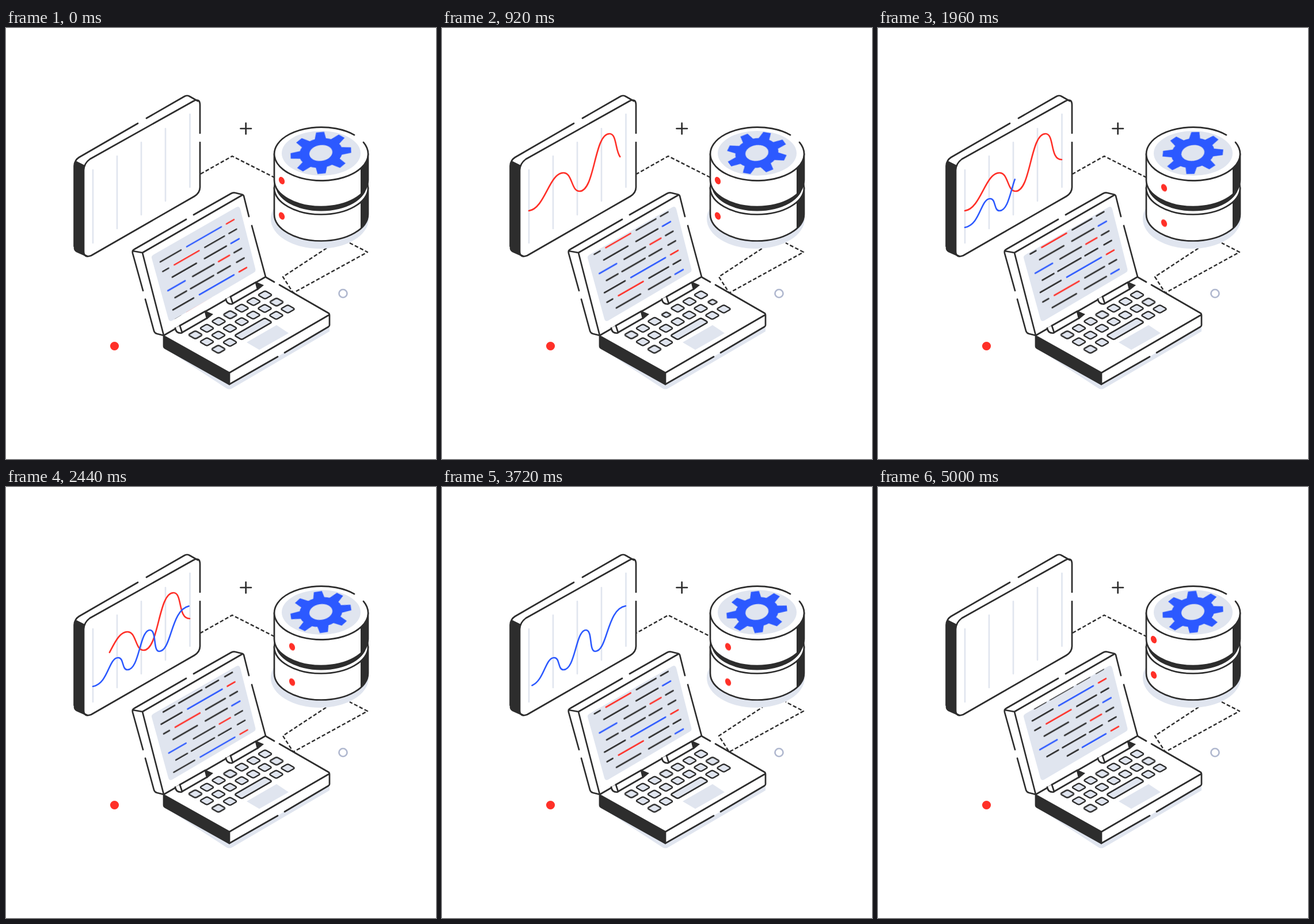
An HTML page without scripts that plays this animation: 747x750 px, repeating every 5040 ms.

```html
<!DOCTYPE html>
<html lang="en">
<head>
<meta charset="utf-8">
<title>Data workstation</title>
<style>
  html, body { margin: 0; width: 100%; height: 100%; overflow: hidden; background: #fff; }
  svg { display: block; }

  .line { fill: none; stroke: #2d2d2d; stroke-width: 2.7; stroke-linecap: round; stroke-linejoin: round; }
  .face { fill: #fff; }
  .dark { fill: #2d2d2d; }
  .pale { fill: #e0e5ef; }
  .red { fill: #ff3028; }
  .blue { fill: #2c59ff; }
  .key { fill: #e0e5ef; stroke-width: 2.5; vector-effect: non-scaling-stroke; }
  .grid { stroke: #e0e5ef; stroke-width: 2.6; stroke-linecap: round; }
  .dashes { stroke-width: 2.4; stroke-dasharray: 6.5 3.5; stroke-linecap: butt; animation: flow 5.04s linear infinite; }

  .code { fill: none; stroke-width: 2.6; stroke-linecap: round; }
  .code path, .k, .r, .b { vector-effect: non-scaling-stroke; }
  .k { stroke: #2d2d2d; }
  .r { stroke: #ff3028; }
  .b { stroke: #2c59ff; }

  .scroll { animation: scroll 5.04s infinite; }
  .curve {
    fill: none; stroke-width: 2.6; stroke-linecap: round;
    stroke-dasharray: 1 3; stroke-dashoffset: 1.01; vector-effect: none;
    animation: trim 5.04s infinite;
  }
  .late { animation-delay: 1.44s; }
  .gear { animation: spin 5.04s linear infinite; }
  .lights { animation: toggle 5.04s step-end infinite; }
  .press { animation: press 5.04s var(--at) infinite; }

  @keyframes scroll {
    0% { transform: none; animation-timing-function: cubic-bezier(.333, 0, .667, 1); }
    99.2%, 100% { transform: translateY(-334px); }
  }
  @keyframes trim {
    0% { stroke-dashoffset: 1.01; animation-timing-function: cubic-bezier(.333, 0, .667, 1); }
    20.63% { stroke-dashoffset: 0; }
    43.65% { stroke-dashoffset: 0; animation-timing-function: cubic-bezier(.333, 0, .667, 1); }
    64.29%, 100% { stroke-dashoffset: -1.01; }
  }
  @keyframes spin {
    0% { transform: rotate(-1.5deg); }
    99.2%, 100% { transform: rotate(358.5deg); }
  }
  @keyframes flow {
    0% { stroke-dashoffset: 0; }
    99.2%, 100% { stroke-dashoffset: -100; }
  }
  @keyframes toggle {
    0%, 49.2%, 98.4% { transform: none; }
    24.6%, 73.8% { transform: translate(18px, 12.5px); }
  }
  @keyframes press {
    0%, 8%, 100% { transform: none; }
    4% { transform: scale(.68); }
  }
</style>
</head>
<body>
<svg width="747" height="750" viewBox="0 0 747 750">
  <defs>
    <rect id="key" class="line key" x="-7.25" y="-7.25" width="14.5" height="14.5" rx="3"
          transform="matrix(.866 -.5 .866 .5 0 0)"/>
    <path id="tooth" class="blue" d="M-10 -34 L-7 -52.5 H7 L10 -34 Z"/>
    <path id="shade" class="dark" d="M616 244.2 A81.5 46.5 0 0 0 629 219 V264.5 A81.5 46.5 0 0 1 616 289.7 Z"/>
    <path id="panel" d="M257 394 L400 312 Q405 309 407 315 L433 418 Q435 423 430 426 L289 509 Q284 512 282 506 L253 400 Q252 397 257 394 Z"/>
    <clipPath id="screen"><use href="#panel"/></clipPath>
    <g id="hinge">
      <path class="face line" d="M294 522 Q295 531 304 531 L349 505 L346 493 L302 518"/>
      <path class="line" d="M302 518 L306 530"/>
      <path class="dark" d="M346 492 L360 498 L349 507 Z"/>
    </g>
    <!-- five rows of code that repeat -->
    <g id="block">
      <path class="k" d="M0 0h36 M0 16.7h10 M73 16.7h34 M115 16.7h13 M12 33.4h42 M68 33.4h38 M43 50.1h37 M115 50.1h13 M8 66.8h20 M35 66.8h40 M82 66.8h22 M115 66.8h13"/>
      <path class="b" d="M46 0h60 M114 33.4h14 M0 50.1h30"/>
      <path class="r" d="M115 0h13 M20 16.7h43 M88 50.1h19"/>
    </g>
  </defs>

  <!-- connections and small marks -->
  <path class="line dashes" d="M338 254 L393 223 L466 260"/>
  <path class="line dashes" d="M597 374 L628 390 L499 461 L481 433 L557 383"/>
  <path class="line" d="M407.500 175 H426 M416.700 165.500 V184.500"/>
  <circle class="red" cx="188.500" cy="553.500" r="7.600"/>
  <circle cx="585.500" cy="462" r="7" fill="none" stroke="#b0b8cf" stroke-width="2.600"/>

  <!-- monitor -->
  <path class="dark" d="M118 238 Q118 234 121 231 L137 239 L136 389 L142 398 L123 389 Q118 386 118 380 Z"/>
  <path class="face line" d="M135 247 Q136 235 146 228 L326 127 Q337 122 337 134 V183 M337 199 V277 Q337 287 327 293 L148 396 Q135 401 135 388 V247"/>
  <path class="line" d="M118.500 380 V240 Q119 230 127 225 L229 166 M244 157 L310 119 Q315 116.500 319 119 L333 127 M119 382 Q119 387 123 389 L141 397"/>
  <path class="grid" d="M151 247 V374 M193 223 V349 M235 199 V325 M277 175 V301 M319.500 150 V277"/>
  <path class="curve r" pathLength="1" d="M151 318 C179 314 186 252 211 252 C227 252 224 284 239 284 C266 284 264 184 291 184 C307 184 298 229 319 229"/>
  <path class="curve b late" pathLength="1" d="M151 347 C178 342 178 297 195 297 C205 297 201 318 211 318 C232 318 232 249 250 249 C262 249 255 286 266 286 C288 286 286 212 319 207"/>

  <!-- database -->
  <ellipse class="pale" cx="545" cy="332" rx="85" ry="52"/>
  <path class="face line" d="M466 278 V324 A81.500 46.500 0 0 0 629 324 V278"/>
  <use href="#shade" y="59.500"/>
  <ellipse class="face line" cx="547.500" cy="278" rx="81.500" ry="46.500"/>
  <ellipse class="dark" cx="547.500" cy="272.500" rx="79.500" ry="46"/>
  <path class="face line" d="M466 219 V264.500 A81.500 46.500 0 0 0 629 264.500 V219"/>
  <use href="#shade"/>
  <ellipse class="face" cx="547.500" cy="219" rx="81.500" ry="46.500"/>
  <path class="line" d="M621 198.900 A81.500 46.500 0 1 1 605 186.100"/>
  <ellipse class="pale" cx="547.500" cy="218" rx="68.500" ry="39"/>
  <g transform="matrix(1 -.08 0 .69 547 217.500)">
    <g class="gear">
      <circle class="blue" r="37.500"/>
      <use href="#tooth"/>
      <use href="#tooth" transform="rotate(45)"/>
      <use href="#tooth" transform="rotate(90)"/>
      <use href="#tooth" transform="rotate(135)"/>
      <use href="#tooth" transform="rotate(180)"/>
      <use href="#tooth" transform="rotate(225)"/>
      <use href="#tooth" transform="rotate(270)"/>
      <use href="#tooth" transform="rotate(315)"/>
      <circle class="pale" r="20"/>
    </g>
  </g>
  <g class="lights red">
    <ellipse rx="4.700" ry="6.800" transform="translate(479 265.500) rotate(-25)"/>
    <ellipse rx="4.700" ry="6.800" transform="translate(479 327) rotate(-25)"/>
  </g>

  <!-- laptop base -->
  <path class="pale" d="M274 556 L383 627 Q388 630 393 627 L562 528 V510 L388 600 Z"/>
  <path class="face" d="M274 535 L451 433 L562 499 V519 L388 621 V600 Z"/>
  <path class="line" style="fill:#2d2d2d" d="M274 536 L388 600 V620 L276 557 Q274 556 274 553 Z"/>
  <path class="line" d="M388 600 L560 500 M452 434 L466 442 M475 447 L560 496 Q562 497 562 500 V517 Q562 519 560 520 L484 565 M472 572 L388 620"/>
  <path class="pale" d="M418 547 L470 517 L491 531 L440 560 Z"/>
  <g>
    <use href="#key" x="450" y="464.500"/>
    <use href="#key" x="430" y="476"/>
    <use href="#key" x="409.500" y="487.500"/>
    <g transform="translate(389.500 499)"><use href="#key" class="press" style="--at:.72s"/></g>
    <use href="#key" x="369.500" y="510.500"/>
    <use href="#key" x="349" y="522.500"/>
    <g transform="translate(329 534)"><use href="#key" class="press" style="--at:1.58s"/></g>
    <g transform="translate(470 477)"><use href="#key" class="press" style="--at:.72s"/></g>
    <use href="#key" x="449.500" y="488"/>
    <use href="#key" x="429.500" y="499.500"/>
    <use href="#key" x="409.500" y="511"/>
    <use href="#key" x="389" y="522.500"/>
    <use href="#key" x="369" y="534.500"/>
    <use href="#key" x="349" y="546"/>
    <use href="#key" x="489.500" y="489"/>
    <use href="#key" x="469.500" y="500"/>
    <use href="#key" x="389" y="547"/>
    <g transform="translate(369 559)"><use href="#key" class="press" style="--at:2.62s"/></g>
    <rect class="line key" x="-30.500" y="-7.250" width="61" height="14.500" rx="3"
          transform="matrix(.866 -.5 .866 .5 429.500 523.500)"/>
  </g>

  <!-- laptop lid -->
  <path class="face" d="M219 389 L396 287 L412 290 L451 433 L274 535 L258 530 Z"/>
  <path class="line" d="M237 391 L410 291 Q412 290 413 292 L422 328 M427 344 L451 433 L274 535 L237 391 L220 388"/>
  <path class="line" d="M238 457 L220 392 Q219 387 223 385 L313 333 M326 325 L391 288 Q395 286 399 287 L411 290 M242 472 L257 527 Q258 531 262 532 L274 535"/>
  <use href="#panel" class="pale"/>
  <g clip-path="url(#screen)">
    <g class="code" transform="matrix(1 -.575 .263 1 268 407)">
      <g class="scroll">
        <use href="#block"/>
        <use href="#block" y="83.500"/>
        <use href="#block" y="167"/>
        <use href="#block" y="250.500"/>
        <use href="#block" y="334"/>
        <path class="k" d="M39 417.500h19"/>
        <path class="b" d="M65 417.500h41"/>
        <path class="r" d="M115 417.500h13"/>
      </g>
    </g>
  </g>
  <use href="#hinge"/>
  <use href="#hinge" x="88" y="-50.500"/>
</svg>
</body>
</html>
```
